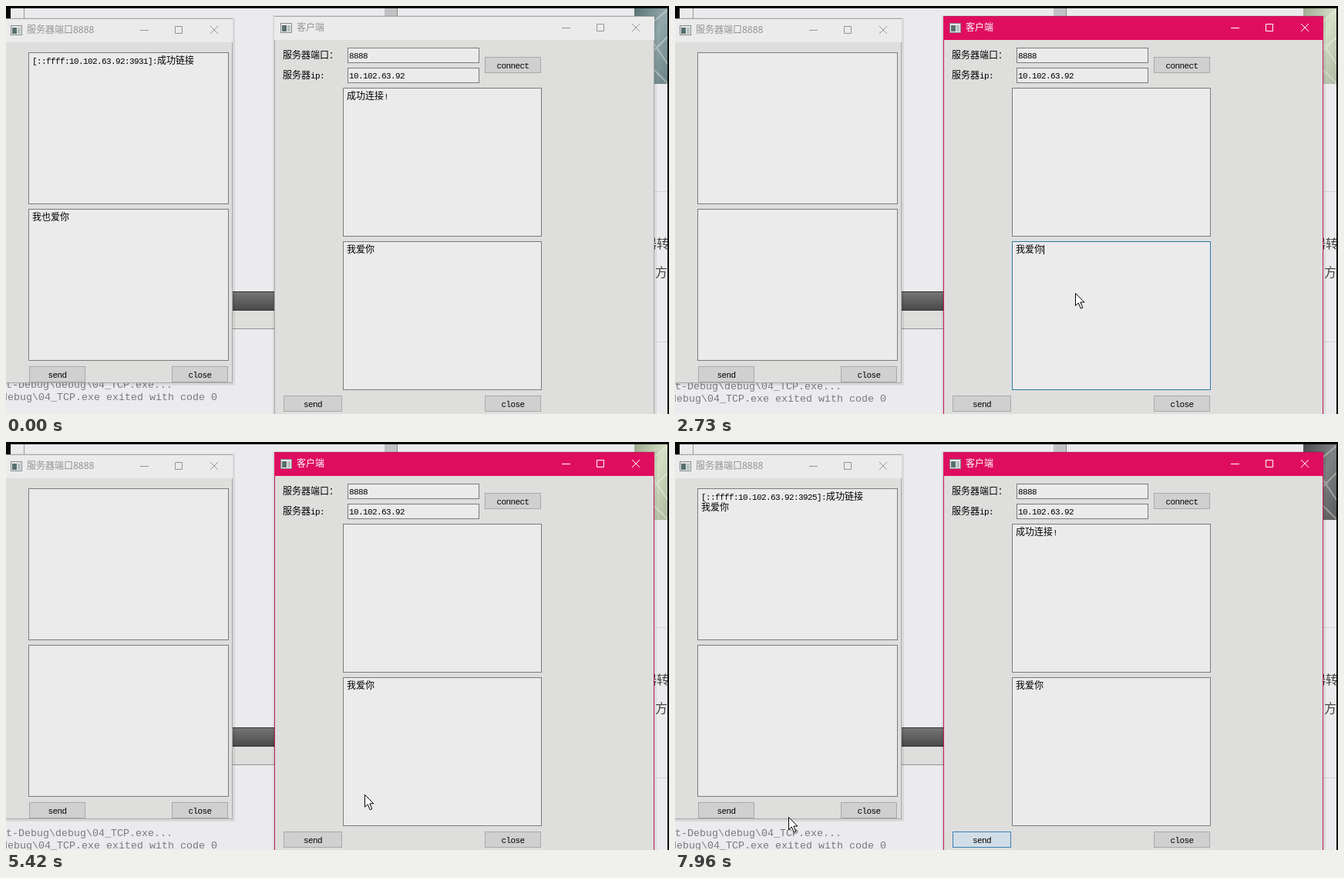
Animation of 860 by 529 pixels, one loop 7990 ms. Source, as an HTML page:

```html
<!DOCTYPE html>
<html lang="zh">
<head>
<meta charset="utf-8">
<style>
html, body { margin: 0; width: 100%; height: 100%; overflow: hidden; background: #000; }
svg { display: block; width: 860px; height: 529px; }
rect, line { shape-rendering: crispEdges; }
text { font: 11px "Liberation Mono", monospace; letter-spacing: -.6px; fill: #000; white-space: pre; }
.cjk { font: 12px "Noto Sans CJK SC", "Noto Sans CJK", sans-serif; letter-spacing: 0; }
.title { font: 12px "Noto Sans", "Noto Sans CJK SC", "Noto Sans CJK", sans-serif; letter-spacing: 0; }
.page { font: 16px "Noto Sans CJK SC", "Noto Sans CJK", sans-serif; letter-spacing: 0; fill: #444; }
.pick { font: 18px "Noto Sans", "Noto Sans CJK SC", "Noto Sans CJK", sans-serif; letter-spacing: 0; fill: #111; }
.num { fill: #666; }
.log { font: 13.333px "Liberation Mono", monospace; letter-spacing: 0; fill: #777b7d; }
</style>
</head>
<body>
<svg id="stage" viewBox="0 0 860 529"></svg>
<script>
const LOOP = 7990;
const stage = document.getElementById('stage');

// Latest value whose start time has passed
const step = (t, list) => list.filter(([start]) => start <= t).pop().slice(1);

// Eased value between timed points
function tween(t, points) {
  let i = points.findIndex(p => p[0] > t);
  if (i < 0) i = points.length;
  const a = points[Math.max(i - 1, 0)], b = points[Math.min(i, points.length - 1)];
  const k = b[0] > a[0] ? (t - a[0]) / (b[0] - a[0]) : 0;
  const e = k * k * (3 - 2 * k);
  return a.slice(1).map((v, n) => v + (b[n + 1] - v) * e);
}

const rect = (x, y, w, h, fill, more = '') =>
  `<rect x="${x}" y="${y}" width="${w}" height="${h}" fill="${fill}" ${more}/>`;
const frame = (x, y, w, h, fill, edge) =>
  rect(x + .5, y + .5, w - 1, h - 1, fill, `stroke="${edge}"`);
const text = (x, y, s, more = '') =>
  `<text x="${x}" y="${y}" ${more}>${s.replace(/[^\x00-\x7f]+/g, '<tspan class="cjk">$&</tspan>')}</text>`;
const label = (cls, x, y, s, more = '') => `<text class="${cls}" x="${x}" y="${y}" ${more}>${s}</text>`;
const box = (x, y, w, h, edge = '#7b7b7b') => frame(x, y, w, h, '#ebebeb', edge);

const BUTTON = {
  normal: ['#d0d0d0', '#a9a9a9'],
  focus: ['#d0d2d4', '#5b8db8'],
  hover: ['#d2dee7', '#3a7fb5']
};
const button = (x, y, w, s, state = 'normal') =>
  frame(x, y, w, 21, ...BUTTON[state]) + text(x + w / 2, y + 15, s, 'text-anchor="middle"');

function windowFrame(x, y, w, h, title, active) {
  const ink = active ? '#fff' : '#949494', right = x + w, mid = y + 15;
  const edge = active ? '#c01a5c' : '#a8a8a8';
  return rect(x - 2, y - 1, w + 5, h + 4, '#000', 'opacity=".08"') +
    frame(x, y, w, h, '#dededd', edge) +
    rect(x, y, w, 31, active ? '#df0d60' : '#ebebeb') +
    rect(x, y, w, 1, edge) +
    frame(x + 8, mid - 6, 15, 13, '#e8e8e8', '#858b8b') +
    rect(x + 10, mid - 3, 6, 8, '#58706f') + rect(x + 17, mid - 3, 4, 8, '#b9c2c2') +
    label('title', x + 29, mid + 4, title, `style="fill:${ink}"`) +
    `<path d="M${right - 120} ${mid + .5}h11M${right - 74.5} ${mid - 4.5}h9v9h-9zM${right - 29} ${mid - 5}l10 10m0-10l-10 10"
      fill="none" stroke="${ink}"/>`;
}

function photo(t) {
  const c = tween(t, [[0, 116, 139, 141], [500, 140, 155, 153], [1630, 184, 188, 182], [2730, 182, 194, 170],
    [4570, 178, 192, 164], [7040, 188, 198, 172], [7700, 140, 144, 140], [7960, 98, 99, 100]]);
  const shade = d => `rgb(${c.map(v => Math.round(v + d))})`;
  return `<linearGradient id="photo" x2="1" y2="1"><stop stop-color="${shade(-25)}"/>
    <stop offset=".5" stop-color="${shade(30)}"/><stop offset="1" stop-color="${shade(-10)}"/></linearGradient>` +
    rect(815, 3, 43, 98, 'url(#photo)') +
    `<path d="M838 22L858 5M838 60L858 40M838 45L858 75M840 82L858 100" stroke="#fff" stroke-width="2" opacity=".35"/>`;
}

function backdrop(t) {
  const [startY, exitY] = step(t, [[0, 495, 511], [500, 497, 513], [3700, 529, 497], [5300, 511, 527]]);
  return rect(0, 0, 860, 529, '#ebeaec') +
    rect(0, 3, 6, 13, '#050505') + rect(23, 3, 1, 14, '#999') +
    rect(491, 3, 16, 12, '#c2c2c4') + rect(507, 3, 1, 12, '#888') +
    photo(t) +
    rect(841, 240, 17, 1, '#d6d6d8') + rect(841, 435, 17, 1, '#d6d6d8') +
    label('page', 828, 314, '器转') + label('page', 842, 351, '方') +
    `<linearGradient id="bar" x2="0" y2="1"><stop stop-color="#777"/><stop offset=".5" stop-color="#606060"/>
      <stop offset="1" stop-color="#484848"/></linearGradient>` +
    rect(290, 370, 60, 25, 'url(#bar)') + rect(290, 370, 60, 1, '#333') + rect(290, 394, 60, 1, '#333') +
    rect(290, 395, 60, 23, '#dededd') + rect(290, 418, 60, 1, '#929292') +
    label('log', 0, startY, 't-Debug\\debug\\04_TCP.exe...') +
    label('log', -6, exitY, 'debug\\04_TCP.exe exited with code 0');
}

function server(t) {
  const [first, second, reply] = step(t, [
    [0, '[::ffff:10.102.63.92:3931]:成功链接', '', '我也爱你'],
    [500, '', '', ''],
    [6300, '[::ffff:10.102.63.92:3925]:成功链接', '', ''],
    [7680, '[::ffff:10.102.63.92:3925]:成功链接', '我爱你', '']]);
  return windowFrame(-2, 16, 296, 473, '服务器端口8888', false) +
    box(29, 60, 260, 197) + box(29, 263, 260, 197) +
    text(34, 75, first) + text(34, 89, second) + text(34, 278, reply) +
    button(30, 467, 73, 'send') + button(215, 467, 73, 'close');
}

// Typed letters and the words offered for them
const typing = [
  [0, '我爱你', ''], [500, '', ''],
  [1050, 'w', '我 为 无 问 玩 网 位'],
  [1200, 'wo', '我 握 窝 卧 喔 沃 涡'],
  [1350, "wo'a", '我爱 我 握 窝 卧 喔'],
  [1500, "wo'ai", '我爱 我矮 我哎 喔 我 握'],
  [1900, "wo'ai'n", '我爱你 我爱 喔 我 握'],
  [2060, "wo'ai'ni", '我爱你 我爱 喔 我 握'],
  [2450, '我爱你', '']];

function picker(x, words) {
  let at = x + 14, out = rect(x, 323, 400, 44, '#e0e0e0', 'stroke="#c4c4c4"');
  words.split(' ').forEach((word, i) => {
    const advance = 43 + 18 * word.length;
    if (!i) out += rect(x, 323.5, advance + 1, 43.5, '#eba0c0');
    out += label('pick num', at - 1, 352, String(i + 1)) + label('pick', at + 17, 352, word);
    at += advance;
  });
  return out;
}

function client(t) {
  const active = t >= 500, editing = active && t < 3650;
  const [typed, words] = step(t, typing);
  const [connect, send] = step(t, [[0, 'normal', 'normal'], [3480, 'normal', 'hover'], [5350, 'normal', 'normal'],
    [5900, 'hover', 'normal'], [6480, 'normal', 'normal'], [6850, 'normal', 'focus'], [7400, 'normal', 'hover']]);
  const width = [...typed].reduce((sum, ch) => sum + (ch > '~' ? 12 : 6), 0);
  const caret = 443 + width;
  return windowFrame(348, 13, 493, 520, '客户端', active) +
    text(359, 68, '服务器端口：') + text(359, 94, '服务器ip:') +
    box(443, 54, 171, 20) + box(443, 80, 171, 20) +
    text(445, 68, '8888') + text(445, 94, '10.102.63.92') +
    button(621, 66, 73, 'connect', connect) +
    box(437, 106, 258, 193) + box(437, 305, 258, 193, editing ? '#2b7ba6' : undefined) +
    text(442, 121, t < 500 || t >= 6300 ? '成功连接!' : '') + text(442, 320, typed) +
    button(360, 505, 76, 'send', send) + button(621, 505, 73, 'close') +
    (editing ? rect(caret - 1, 310, 1, 12, '#000') : '') +
    (words ? `<line x1="442" x2="${442 + width}" y1="321.5" y2="321.5" stroke="#000" stroke-dasharray="2 1"/>` +
      picker(caret - 2, words) : '');
}

function pointer(t) {
  if (t < 500) return '';
  const [x, y] = tween(t, [[500, 519, 372], [2760, 519, 372], [3460, 428, 524], [5250, 428, 524], [5940, 668, 87],
    [6400, 668, 87], [6850, 425, 531], [7250, 425, 531], [7420, 420, 522], [7680, 420, 522], [7940, 147, 486]]);
  return `<path transform="translate(${x + .5} ${y + .5})" d="M0 0V16L3.8 12.6L6.8 19.6L9.4 18.5L6.4 11.6H11.4Z"
    fill="#fff" stroke="#000"/>`;
}

function draw() {
  const t = performance.now() % LOOP;
  stage.innerHTML = backdrop(t) + server(t) + client(t) + pointer(t) +
    rect(0, 0, 860, 3, '#000') + rect(858, 0, 2, 529, '#000');
  requestAnimationFrame(draw);
}
draw();
</script>
</body>
</html>
```
